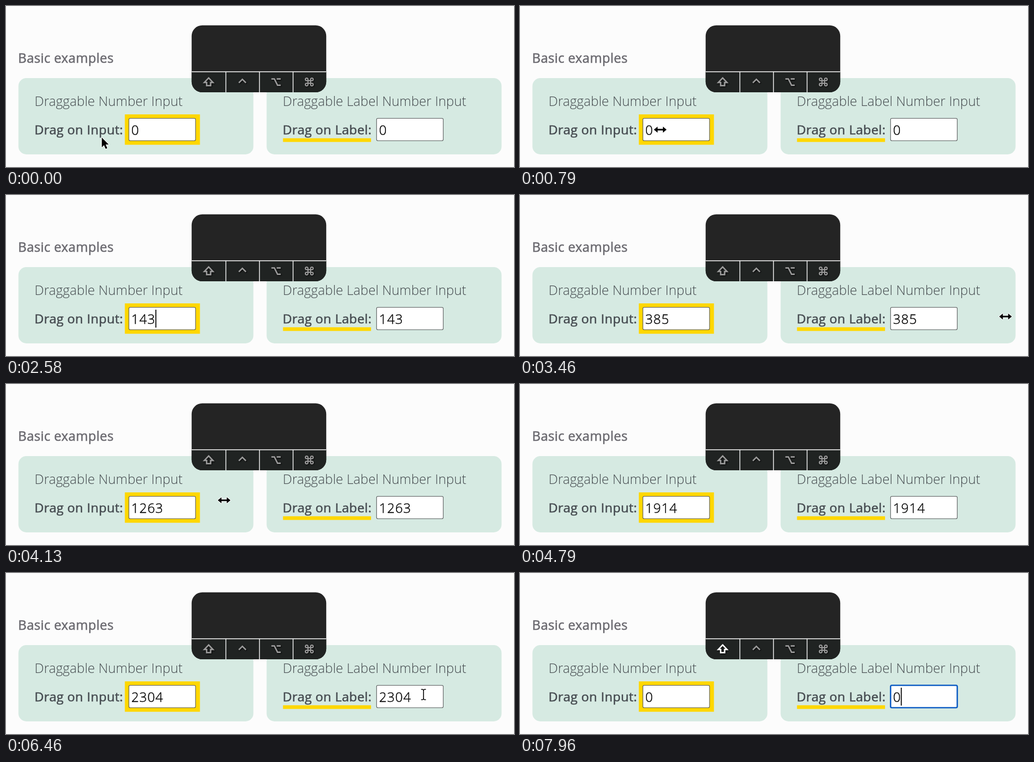
An HTML page for the animation above (8000 ms loop, 960 by 306 pixels).

```html
<!DOCTYPE html>
<html lang="en">
<head>
<meta charset="utf-8">
<title>Draggable number inputs</title>
<style>
  html, body { margin: 0; width: 100%; height: 100%; overflow: hidden; background: #fcfcfc; }
  svg { display: block; width: 960px; height: 306px; }
  text { font-family: "Open Sans", sans-serif; white-space: pre; }
  .head, .label { letter-spacing: .35px; stroke-width: .6; }
  .head { font-size: 24.7px; fill: #6b6a70; stroke: #6b6a70; }
  .label { font-size: 24.3px; fill: #474d52; stroke: #474d52; }
  .title { font-size: 25px; font-weight: 300; letter-spacing: .04px; fill: #454b4f; }
  .num { font-size: 25px; font-weight: 300; letter-spacing: .95px; stroke: #000; stroke-width: .4; }
  .card { fill: #d6eae2; }
  .mark { fill: #ffd700; }
  .field { fill: #fff; stroke: #555859; stroke-width: 1.1; }
  .focus { fill: #fff; stroke: #0d5cc4; stroke-width: 2.6; }
  .key { fill: none; stroke: #9b9b9b; stroke-width: 2.7; filter: drop-shadow(1px 1.5px 1px #000); }
  .key.lit { stroke: #fff; }
  .pressed { font: 60px "Liberation Sans", Arial, sans-serif; fill: #fff; text-anchor: middle; }
  .cursor { fill: #000; stroke: #fff; stroke-width: 2; paint-order: stroke; stroke-linejoin: round; }
</style>
</head>
<body>
<svg viewBox="0 0 960 306">
  <rect width="960" height="306" fill="#fcfcfc"/>
  <text class="head" x="22.8" y="108">Basic examples</text>

  <rect class="card" x="23.5" y="137" width="444" height="145" rx="15"/>
  <text class="title" x="54" y="190">Draggable Number Input</text>
  <text class="label" x="53.8" y="244.3">Drag on Input:</text>
  <rect class="mark" x="224.6" y="206" width="141.9" height="57.7"/>
  <rect class="field" x="232.2" y="213.5" width="126" height="42.5" rx="2.5"/>

  <rect class="card" x="492.5" y="137" width="444" height="145" rx="15"/>
  <text class="title" x="523" y="190">Draggable Label Number Input</text>
  <rect class="mark" x="523.5" y="251.4" width="166.3" height="7"/>
  <text class="label" x="522.8" y="244.3">Drag on Label:</text>
  <rect class="field" id="field" x="700.3" y="213.5" width="126" height="42.5" rx="2.5"/>

  <rect id="selection" x="705" y="218" width="61" height="34" fill="#b3d7ff"/>
  <text class="num" id="numA" x="236.7" y="244.5"></text>
  <text class="num" id="numB" x="705" y="244.5"></text>
  <rect id="caretA" y="218" width="1.8" height="34"/>
  <rect id="caretB" y="218" width="1.8" height="34"/>

  <rect x="350.8" y="36.8" width="254.4" height="127.2" rx="20" fill="#242424"/>
  <path d="M350.8 125h254.4v19a20 20 0 0 1-20 20h-214.4a20 20 0 0 1-20-20z" fill="#202322"/>
  <path d="M351 125H605M415.5 125V164M479 125V164M542.5 125V164" stroke="#fff" stroke-width="1.4"/>
  <text class="pressed" id="pressed" x="478" y="102">0</text>
  <path class="key" id="shift" d="M383 136.8l8.2 8.6h-4.4v6h-7.6v-6h-4.4z"/>
  <path class="key" stroke-width="3" d="M440 146l6.7-6.6 6.7 6.6"/>
  <path class="key" d="M501.5 138.7h5.7l6 12h6M511.5 138.7h7.7"/>
  <path class="key" transform="translate(563.3 134.6) scale(.82)"
    d="M18 3a3 3 0 0 0-3 3v12a3 3 0 1 0 3-3H6a3 3 0 1 0 3 3V6a3 3 0 1 0-3 3h12a3 3 0 0 0 0-6"/>

  <path class="cursor" id="cursor"/>
</svg>
<script>
const LOOP = 8000, FPS = 24;
const SCALE = 1.27;   // stage pixels per unit dragged
const WRAP = 1620;    // the drag cursor wraps around the window

const SHAPES = {
  arrow: 'M0 0V18.4l4.2-4 3.1 7.2 3.1-1.3-3.1-7h5.8z',
  resize: 'M-12 0l7-5.8v4.4H5v-4.4l7 5.8-7 5.8v-4.4H-5v4.4z',
  beam: 'M-4.5-10.5h3l1.5 1 1.5-1h3v1.4h-2.6l-1.1 1v16.2l1.1 1h2.6v1.4h-3l-1.5-1-1.5 1h-3v-1.4h2.6l1.1-1v-16.2l-1.1-1h-2.6z'
};

const el = id => document.getElementById(id);
const between = (t, a, b) => t >= a && t < b;
const show = (id, on) => el(id).style.display = on ? '' : 'none';

// Progress from a to b: straight, eased, and out-and-back
const line = (t, a, b) => Math.min(1, Math.max(0, (t - a) / (b - a)));
const ease = (t, a, b) => { const u = line(t, a, b); return u * u * (3 - 2 * u); };
const arc = (t, a, b) => Math.sin(Math.PI * line(t, a, b));

// Left, back right, then two long pulls on the label
function valueAt(t) {
  const pull = .66 * ease(t, 3125, 4790) + .34 * line(t, 3125, 4790);
  return -157 * ease(t, 958, 1417) + 300 * ease(t, 1417, 1960)
    + 1771 * pull + 390 * ease(t, 5400, 5880);
}

function dragCursor(t, value) {
  if (t < 2120) {
    const y = 236 + 8 * ease(t, 958, 1417) - 13 * ease(t, 1417, 1790) - 35 * arc(t, 1417, 1790);
    return ['resize', 265.4 + value * SCALE, y];
  }
  const x = 609.7 + (value - 143) * SCALE;
  return ['resize', x % WRAP, 231 - 20 * ease(t, 3458, 4790) - 8 * ease(t, 5400, 5880)];
}

function hoverShape(x, y) {
  if (y < 213 || y > 257) return 'arrow';
  if (between(x, 232, 359) || between(x, 524, 690)) return 'resize';
  return between(x, 700, 827) ? 'beam' : 'arrow';
}

function freeCursor(t) {
  const toLabel = ease(t, 2120, 2917), toField = ease(t, 6035, 6458);
  const x = 181 + 84 * ease(t, 30, 790) + 345 * toLabel + 179 * toField
    + 225 * arc(t, 6035, 6458) - 8 * ease(t, 6458, 6790);
  const y = 250 - 15 * ease(t, 30, 790) - 6 * toLabel + 2 * toField
    + 18 * arc(t, 2120, 2917) + 20 * arc(t, 6035, 6458);
  return [hoverShape(x, y), x, y];
}

function placeCaret(id, left, text, on) {
  el(id).setAttribute('x', left + text.length * 15.25);
  show(id, on);
}

function draw(t) {
  const typed = t >= 7245, focused = t >= 6650;
  const value = typed ? 0 : valueAt(t);
  const text = String(Math.round(value) || 0);
  el('numA').textContent = el('numB').textContent = text;

  el('field').setAttribute('class', focused ? 'focus' : 'field');
  show('selection', focused && !typed);
  placeCaret('caretA', 236.6, text, between(t, 1955, 2910));
  placeCaret('caretB', 704.4, text, typed && !between(t, 7575, 7870));
  show('pressed', between(t, 7245, 7870));
  el('shift').classList.toggle('lit', t >= 7950);

  const dragging = between(t, 950, 2120) || between(t, 3120, 6030);
  const [shape, x, y] = dragging ? dragCursor(t, value) : freeCursor(t);
  show('cursor', !typed && !between(t, 2540, 2660));
  el('cursor').setAttribute('d', SHAPES[shape]);
  el('cursor').setAttribute('transform', `translate(${x.toFixed(1)} ${y.toFixed(1)})`);
}

let start;
function tick(now) {
  start ??= now;
  const step = Math.floor((now - start) % LOOP * FPS / 1000 + .15);
  draw(step * 1000 / FPS % LOOP);
  requestAnimationFrame(tick);
}
draw(0);
requestAnimationFrame(tick);
</script>
</body>
</html>
```
